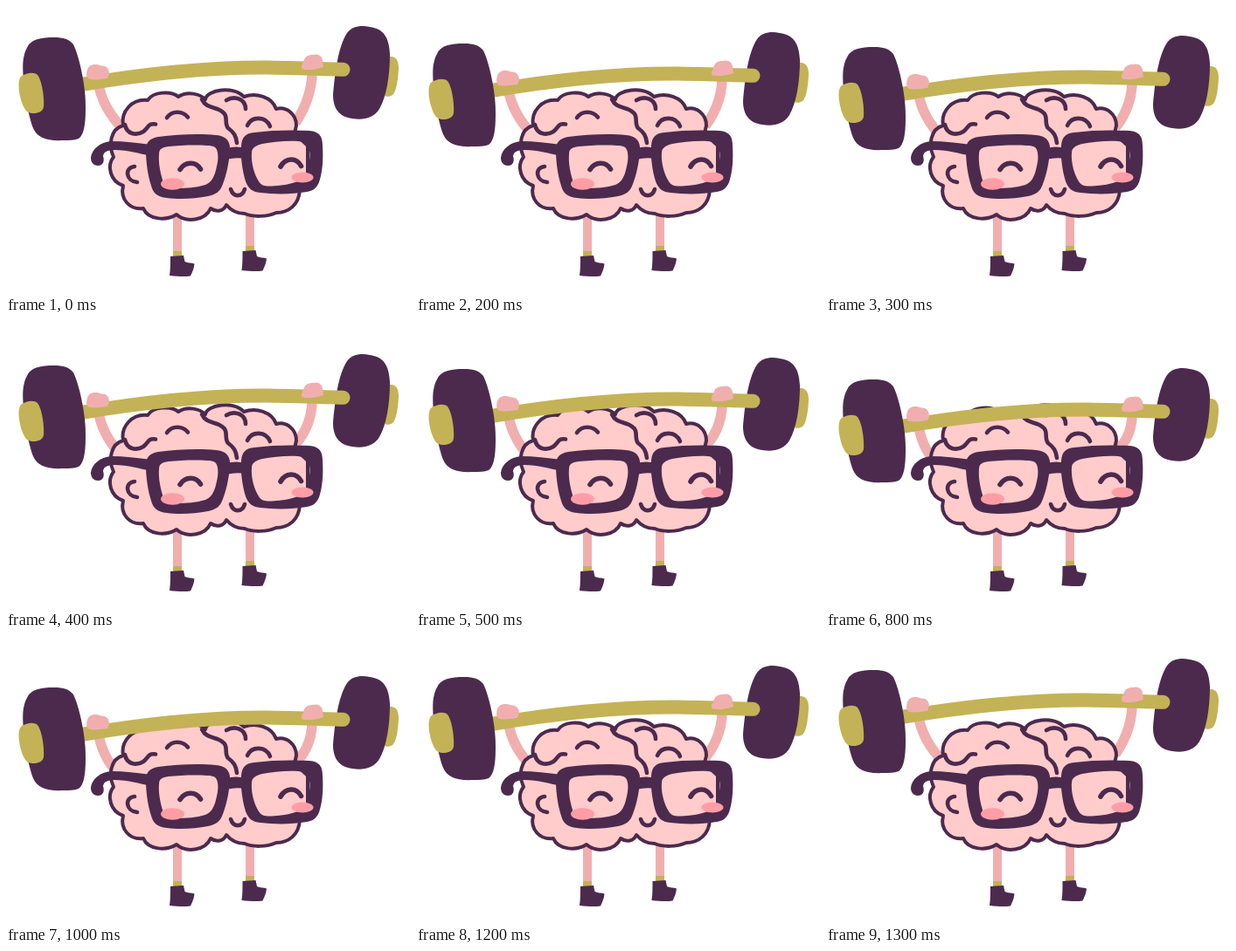
Recreate the animation shown at these times as an HTML page. Size 462 by 329 pixels, loop 1.4 s.

```html
<!DOCTYPE html>
<html lang="en">
<head>
<meta charset="utf-8">
<title>Brain workout</title>
<style>
html, body { margin: 0; width: 100%; height: 100%; overflow: hidden; background: #fff; }
svg { display: block; width: 100vw; height: 100vh; }
.dark { fill: #4c2a4e; }
.gold { fill: #c4b256; }
.skin { fill: #f0afae; }
.cheek { fill: #ff9da6; }
.arm { fill: none; stroke: #f0afae; stroke-width: 11.5; }
.bar { fill: none; stroke: #c4b256; stroke-width: 16; stroke-linecap: round; }
.brain { fill: #ffcccb; stroke: #4c2a4e; stroke-width: 4; stroke-linejoin: round; }
.line { fill: none; stroke: #4c2a4e; stroke-width: 4.6; stroke-linecap: round; stroke-linejoin: round; }
.eye { stroke-width: 5.6; }
</style>
</head>
<body>
<svg viewBox="0 0 462 329">
  <path id="armL" class="arm"/>
  <path id="armR" class="arm"/>

  <g id="legs">
    <path class="skin" d="M191 235H201V282H191Z M274 235H284V276H274Z"/>
    <path class="gold" d="M191 281H201V288H191Z M274 275H284V282H274Z"/>
    <path id="boot" class="dark" d="M188 287L203 286L204.500 293C208 295 212 294 215.500 295.500C215 301 213 305 211 309.500C204 310.500 196 310 187 309C188 302 188 295 188 287Z"/>
    <use href="#boot" x="82.500" y="-6"/>
  </g>

  <path class="brain" d="M134 137C131 121 144 106 162 108C168 98 189 97 197 104C208 97 222 101 228 107
    C230 96 260 91 272 104C286 99 304 104 309 118C321 115 332 124 332 137L330 146L345 160V205L336 211
    C335 228 323 237 309 237C298 242 282 242 273 238C264 238 257 234 252 228
    C249 235 241 237 234 232C228 246 206 249 195 239C184 246 163 246 157 232C142 234 130 222 134 206
    C119 201 115 183 123 173C117 160 119 141 134 137Z"/>

  <g class="line">
    <path d="M136 136C138 147 149 149 157 144C163 140 162 134 171 135.500"/>
    <path d="M184 128C190 119.500 202 120 208 127.500"/>
    <path d="M224 107C229 118 240 115 247 121C255 126 249 134 254 140C261 145 263 149 264 157"/>
    <path d="M252 108C262 102 274 107 274 118"/>
    <path d="M276 137C281 126 297 126 302 138"/>
    <path d="M147 184C135 185 137 201 150 202"/>
    <path d="M257 210C260 219.500 270 219.500 273 210"/>
    <path class="eye" d="M199 187.500C205 178 217 178 222.500 187"/>
    <path class="eye" d="M314 184C320 173.500 332 173.500 337.500 183.500"/>
  </g>

  <g class="dark">
    <path d="M166 159C150 157 135 155 120 155C108 156 98 164 97 174C97 180 101 183 105 183C111 183 113 178 111 172C112 167 116 165 124 165C140 165 152 169 166 172Z"/>
    <path fill-rule="evenodd" d="M160 166C160 156 164 152 174 150C196 147 222 146 240 148
      C252 149 257 155 256 166C255 180 252 194 248 204C245 213 240 216 231 218
      C216 221 198 222 184 220C173 219 168 214 166 206C162 194 160 178 160 166Z
      M175 170C174 180 177 194 180 202C182 208 186 209 194 209C206 209 218 208 228 205
      C235 202 238 196 240 188C242 180 243 175 242 168C241 162 238 160 230 160
      C214 159 198 160 186 161C178 162 175 164 175 170Z"/>
    <path fill-rule="evenodd" d="M269 160C270 150 274 146 284 145C305 142 329 142 347 143
      C358 144 362 149 362 160C363 176 362 190 358 202C355 209 351 212 344 213C327 216 307 216 291 214
      C281 213 277 209 274 201C270 188 268 171 269 160Z
      M281 168C280 180 284 193 289 201C292 206 297 207 304 206.500C316 206 326 204 334 201
      C341 198 344 192 346 185C347 177 348 172 347 166C346 158 342 156 334 155
      C320 154 305 156 293 158C285 160 281 163 281 168Z"/>
    <path d="M252 163Q263 160 274 163V175Q263 173 252 176Z"/>
  </g>

  <ellipse class="cheek" cx="190.500" cy="204" rx="13.500" ry="6.700"/>
  <ellipse class="cheek" cx="339" cy="196.500" rx="12.500" ry="6"/>

  <g id="barbell">
    <path class="gold" d="M436 58C446 57 449 62 449 72C448 88 446 98 442 102C438 105 432 104 429 101Z"/>
    <path class="dark" d="M390 31C396 23 406 22 416 24C432 26 438 36 439 55C439 80 435 104 427 118C420 129 408 131 396 129C380 127 374 116 374 102C376 80 379 48 390 31Z"/>
    <path class="bar" d="M80 91C150 79 230 70 300 70.500C330 71 360 72 385.500 72.800"/>
    <path class="dark" d="M24 48C28 38 40 36 55 36C66 36 72 38 77 44C84 58 92 95 91 118C91 136 89 148 83 152C78 154 72 154 66 154C46 155 36 151 31 140C24 122 17 76 20 60C21 55 22 51 24 48Z"/>
    <path class="gold" d="M17 81C22 77 32 75 36 79C41 85 44 105 43 116C42 123 30 125 24 121C17 115 11 88 17 81Z"/>
    <path class="skin" d="M93 73C95 66 104 66 109 68.500C115 68 118 72 118 78L116 83C108 84 102 85 95 84C91 81 92 77 93 73Z"/>
    <path class="skin" d="M340 65C341 58 345 56 351 56C357 54 362 58 362 63L363 70C356 73 346 74 339 72.500C337 70 338 67 340 65Z"/>
  </g>
</svg>
<script>
const STEP = 100;
// how far the barbell has sunk at each step
const drops = [0, 3, 7, 11, 15, 19, 23, 27, 31, 27, 23, 19, 11, 3];
const $ = id => document.getElementById(id);
const barbell = $("barbell"), armL = $("armL"), armR = $("armR");

// hands follow the bar, shoulders give way only a little
function pose(y) {
  barbell.setAttribute("transform", `translate(0 ${y})`);
  armL.setAttribute("d", `M105 ${86 + y}Q110 ${118 + y * 0.9} ${136 - y * 0.35} ${143 + y * 0.6}`);
  armR.setAttribute("d", `M350 ${68 + y}Q352 ${102 + y} 331 ${134 + y * 0.5}`);
}

const start = performance.now();
function tick() {
  const n = Math.floor((performance.now() - start) / STEP);
  pose(drops[n % drops.length]);
  requestAnimationFrame(tick);
}
tick();
</script>
</body>
</html>
```
